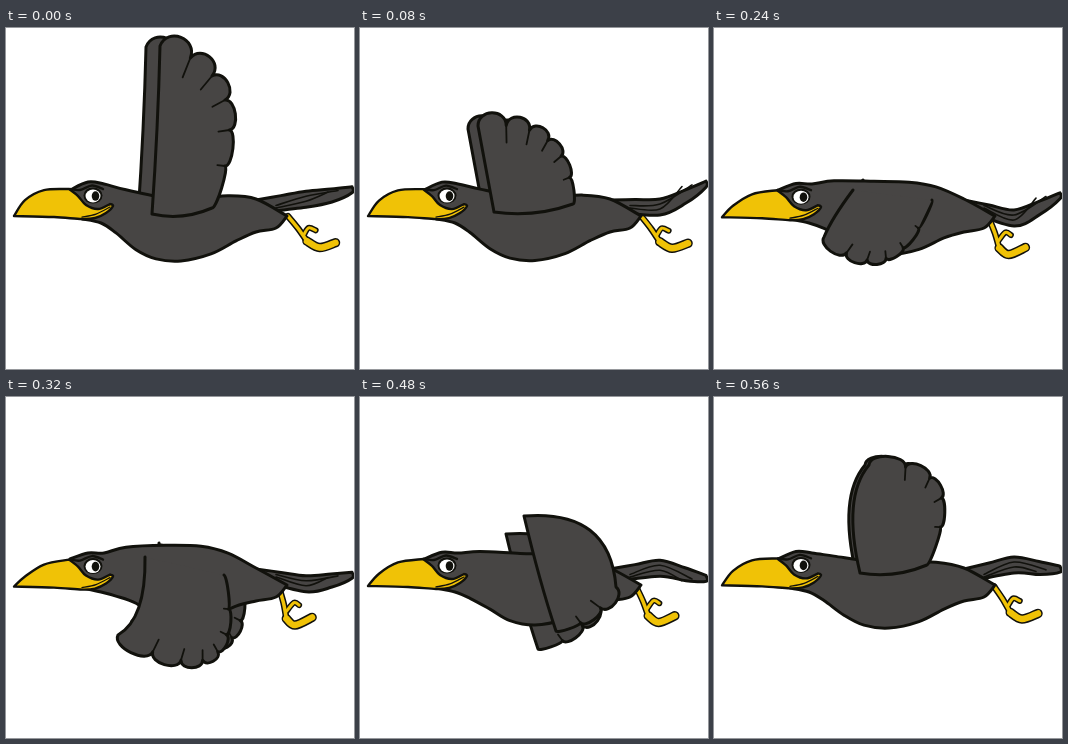
These frames come from a looping animation (348 by 341 pixels, 640 ms). An HTML page with a canvas:

```html
<!DOCTYPE html>
<html lang="en">
<head>
<meta charset="utf-8">
<title>Flying crow</title>
<style>
html, body { margin: 0; width: 100%; height: 100%; overflow: hidden; background: #fff; }
canvas { display: block; }
</style>
</head>
<body>
<canvas id="stage" width="348" height="341"></canvas>
<script>
const ctx = document.getElementById('stage').getContext('2d');
const STEP = 80, POSES = 8;
const INK = '#11110c', FEATHER = '#474544', YELLOW = '#f0c206';

// Cosine over one wingbeat that peaks at the given pose.
const wave = (pose, peak) => Math.cos((pose - peak) / POSES * 2 * Math.PI);
const shift = ([x, y], dx, dy) => [x + dx, y + dy];
const bend = (a, b, c, t) =>
  a.map((v, i) => (1 - t) ** 2 * v + 2 * t * (1 - t) * b[i] + t * t * c[i]);

// Smooth runs of points, joined by corners.
function curve(...runs) {
  const path = new Path2D();
  path.moveTo(...runs[0][0]);
  let end;
  for (const run of runs) {
    const pts = end ? [end, ...run] : run;
    for (let i = 0; i < pts.length - 1; i++) {
      const b = pts[i], c = pts[i + 1], a = pts[i - 1] || b, d = pts[i + 2] || c;
      path.bezierCurveTo(
        b[0] + (c[0] - a[0]) / 6, b[1] + (c[1] - a[1]) / 6,
        c[0] - (d[0] - b[0]) / 6, c[1] - (d[1] - b[1]) / 6, ...c);
    }
    end = pts[pts.length - 1];
  }
  return path;
}

function stroke(path, width, color = INK) {
  ctx.lineWidth = width;
  ctx.strokeStyle = color;
  ctx.stroke(path);
}

function shape(path, fill = FEATHER, width = 3) {
  path.closePath();
  ctx.fillStyle = fill;
  ctx.fill(path);
  stroke(path, width);
}

function ellipse(x, y, rx, ry, fill) {
  ctx.beginPath();
  ctx.ellipse(x, y, rx, ry, 0, 0, 7);
  ctx.fillStyle = fill;
  ctx.fill();
}

// The front edge bends from `front` through `lead` to `tip`; the feathered edge
// bends from `tip` through `trail` to `back`. `far` offsets the other wing.
const wings = [
  { front: [146, 186], lead: [152, 100], tip: [154, 18], trail: [258, 45], back: [206, 180], feathers: 6, depth: 22, far: [-14, 1] },
  { front: [134, 184], lead: [126, 140], tip: [118, 98], trail: [210, 88], back: [213, 176], feathers: 6, depth: 18, far: [-10, 3] },
  { front: [160, 192], lead: [116, 190], tip: [114, 160], trail: [165, 153], back: [229, 169], feathers: 5, depth: 12, far: [-6, 0] },
  { front: [139, 162], lead: [118, 190], tip: [110, 209], trail: [180, 270], back: [218, 172], feathers: 6, depth: 11, far: [10, -10] },
  { front: [139, 160], lead: [140, 222], tip: [112, 238], trail: [245, 312], back: [218, 178], feathers: 7, depth: 14, far: [14, -14] },
  { front: [139, 160], lead: [134, 240], tip: [138, 324], trail: [252, 332], back: [222, 190], feathers: 6, depth: 20, far: [-8, -40] },
  { front: [164, 119], lead: [250, 112], tip: [256, 190], trail: [236, 226], back: [196, 234], feathers: 3, depth: 15, far: [-18, 18] },
  { front: [146, 176], lead: [128, 100], tip: [155, 68], trail: [262, 62], back: [213, 168], feathers: 5, depth: 14, far: [-4, 0] }
];

function drawWing({ front, lead, tip, trail, back, feathers, depth }) {
  const raised = (tip[0] - front[0]) * (back[1] - front[1]) > (tip[1] - front[1]) * (back[0] - front[0]);
  const edge = new Path2D(), creases = new Path2D();
  edge.moveTo(...front);
  edge.quadraticCurveTo(...lead, ...tip);
  let from = tip;
  for (let i = 1; i <= feathers; i++) {
    const t = i / feathers, to = bend(tip, trail, back, t);
    const dx = to[0] - from[0], dy = to[1] - from[1];
    const reach = depth * (1.1 - 0.9 * t) / Math.hypot(dx, dy) * (raised ? 1 : -1);
    const out = [dy * reach, -dx * reach];
    edge.bezierCurveTo(...shift(from, ...out), ...shift(to, ...out), ...to);
    if (i < feathers) {
      creases.moveTo(...to);
      creases.lineTo(to[0] - out[0], to[1] - out[1]);
    }
    from = to;
  }
  // A lowered wing blends into the shoulder, so its root stays open.
  if (raised) edge.quadraticCurveTo((front[0] + back[0]) / 2, (front[1] + back[1]) / 2 + 10, ...front);
  ctx.fillStyle = FEATHER;
  ctx.fill(edge);
  stroke(edge, 3);
  stroke(creases, 1.8);
}

function drawFarWing(wing) {
  const moved = { ...wing };
  for (const key of ['front', 'lead', 'tip', 'trail', 'back']) moved[key] = shift(wing[key], ...wing.far);
  drawWing(moved);
}

function drawTail(pose) {
  const mid = 171 - 11 * wave(pose, 7), tip = 169 - 14 * wave(pose, 1.2);
  shape(curve(
    [[250, 172], [275, (172 + mid) / 2], [300, mid], [325, (mid + tip) / 2 - 1], [346, tip - 2]],
    [[346, tip + 4], [326, (mid + tip) / 2 + 12], [300, mid + 16], [258, 184]]));
  for (const drop of [5, 10]) {
    stroke(curve([[270, 175 + drop / 2], [300, mid + drop], [342 - drop * 2, tip + drop / 3]]), 1.6);
  }
}

function drawLeg(c) {
  const length = 50 + 7 * c, sag = 16 - 2.5 * c;
  ctx.save();
  ctx.translate(278 + 4 * c, 191 - 3 * c);
  ctx.rotate((32 - 5 * c) * Math.PI / 180);
  const ankle = [length * 0.5, sag];
  const shin = curve([[0, 0], [length * 0.25, sag * 0.45], ankle]);
  const foot = curve([ankle, [length * 0.75, sag], [length * 0.96, 2]]);
  const toe = curve([[length * 0.4, sag * 0.7], [length * 0.42, 1], [length * 0.55, 0]]);
  for (const [color, rim] of [[INK, 3], [YELLOW, 0]]) {
    stroke(shin, 3.5 + rim, color);
    stroke(toe, 3 + rim, color);
    stroke(foot, 6.5 + rim, color);
  }
  ctx.restore();
}

function drawBody(c) {
  shape(curve(
    [[64, 162], [82, 155 - c], [98, 156], [120, 156 + 6 * c], [160, 159 + 11 * c],
      [195, 160 + 11 * c], [222, 162 + 6 * c], [250, 171], [281, 188]],
    [[270, 200], [250, 204], [230, 211 + 2 * c], [205, 223 + 3 * c], [175, 229 + 4 * c],
      [150, 225 + 6 * c], [130, 214 + 8 * c], [110, 202 + 3 * c], [95, 195], [76, 191]]));
}

function drawHead(c) {
  const flat = 1 - c;
  ctx.save();
  ctx.translate(0, flat * 0.8);
  shape(curve(
    [[8, 188], [19, 172 + 3 * flat], [38, 162 + 2 * flat], [63, 161]],
    [[72, 168], [80, 177], [92, 181], [104, 176]],
    [[107, 178], [100, 185], [89, 190], [76, 191], [48, 189], [8, 188]]), YELLOW, 2.4);
  stroke(curve([[76, 189], [90, 186], [104, 179]]), 1.3);
  ellipse(87, 167.5, 9.5, 8, INK);
  ellipse(87, 168, 7.5, 6.5, '#fff');
  ellipse(89.5, 168, 3.8, 4.8, INK);
  stroke(curve([[64, 161], [74, 162], [86, 157.5], [97, 161]]), 2.4);
  ctx.restore();
}

function drawBird(pose) {
  const c = wave(pose, 0.3);
  ctx.clearRect(0, 0, 348, 341);
  drawFarWing(wings[pose]);
  drawLeg(c);
  drawTail(pose);
  drawBody(c);
  drawWing(wings[pose]);
  drawHead(c);
}

ctx.lineCap = ctx.lineJoin = 'round';
function frame() {
  drawBird(Math.floor(performance.now() / STEP) % POSES);
  requestAnimationFrame(frame);
}
frame();
</script>
</body>
</html>
```
